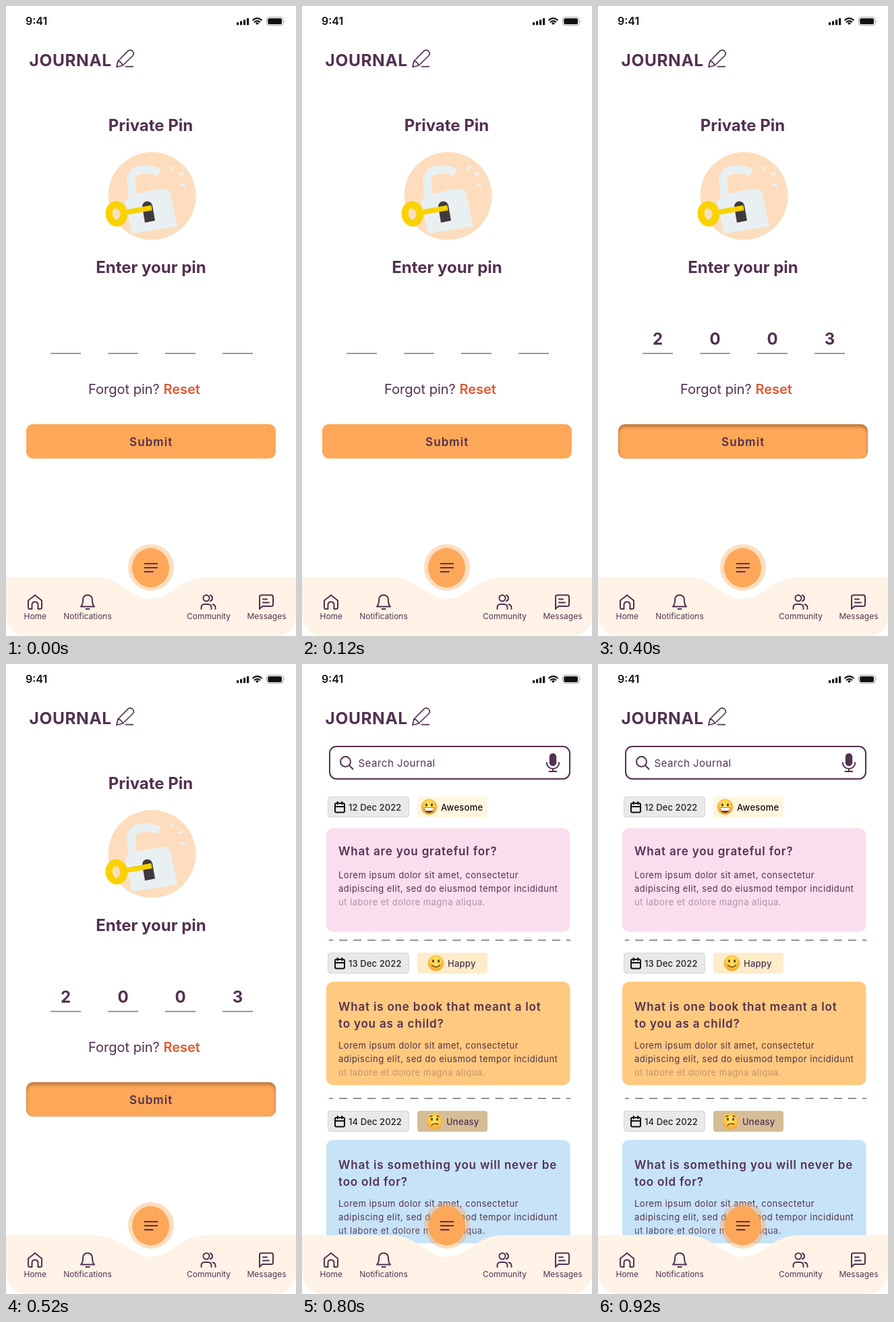
Animation, 430 px wide and 932 px high, one loop 1000 ms. Source, as an HTML page:

```html
<!DOCTYPE html>
<html lang="en">
<head>
<meta charset="utf-8">
<title>Journal pin</title>
<style>
  html, body { margin: 0; width: 100%; height: 100%; overflow: hidden; background: #fff; }
  svg { display: block; position: absolute; left: 0; top: 0; }
  text { font-family: Inter, sans-serif; fill: #533050; white-space: pre; }
  .mid { text-anchor: middle; }
  .head { font-weight: 700; font-size: 24px; }
  .nav { font-size: 12px; text-anchor: middle; }
  .line { fill: none; stroke: #533050; stroke-width: 2; stroke-linecap: round; stroke-linejoin: round; }
  .ask { font-weight: 600; font-size: 17px; letter-spacing: .82px; }
  .body { font-size: 13px; letter-spacing: .5px; }
  .chip { font-weight: 500; font-size: 13px; letter-spacing: .1px; }
  .cal { fill: none; stroke: #111; stroke-width: 2; stroke-linecap: round; }
  #press { position: absolute; left: 30px; top: 618.5px; width: 370px; height: 51px; border-radius: 10px;
    box-shadow: inset 0 4px 4px rgba(0, 0, 0, .25), inset 0 0 2px rgba(0, 0, 0, .25); }
</style>
</head>
<body>
<svg width="430" height="932" viewBox="0 0 430 932">
  <defs>
    <radialGradient id="skin" cx=".5" cy=".4" r=".6">
      <stop offset=".3" stop-color="#ffe05a"/><stop offset="1" stop-color="#f5a62a"/>
    </radialGradient>
  </defs>
  <rect id="paper" width="430" height="932" rx="30" fill="#fff"/>
  <g id="screen">
    <!-- status bar -->
    <text x="29" y="28" font-size="16" font-weight="600" style="fill:#111">9:41</text>
    <g fill="#111">
      <rect x="342" y="24" width="3.2" height="4.3" rx=".8"/>
      <rect x="347" y="22.3" width="3.2" height="6" rx=".8"/>
      <rect x="352" y="20.2" width="3.2" height="8.1" rx=".8"/>
      <rect x="357" y="18" width="3.2" height="10.3" rx=".8"/>
      <path d="M372.5 28l-2.6-2.7q2.6-2 5.2 0z"/>
      <rect x="388.3" y="18.3" width="20.7" height="8.6" rx="2"/>
      <path d="M412.2 20.6q1.8 1.9 0 4z" opacity=".45"/>
    </g>
    <g fill="none" stroke="#111">
      <path d="M365.5 21.2q7-6.2 14 0M368 24q4.500-3.800 9 0" stroke-width="2"/>
      <rect x="386.600" y="16.600" width="24.300" height="12" rx="3.500" opacity=".4"/>
    </g>

    <!-- title -->
    <text x="34.500" y="89" font-size="24.500" font-weight="700" letter-spacing=".6">JOURNAL</text>
    <path class="line" stroke-width="1.700" style="stroke-width:1.700" d="M164 90.300L166 81.500L180.800 66.700Q184 63.500 187.500 66.500Q191 70 188 73.500L173 88ZM166 81.500Q171.500 82.500 173 88M177.500 89.600H188.500"/>

    <g id="pin">
      <text class="head mid" x="214.500" y="185">Private Pin</text>
      <circle cx="216.500" cy="281" r="65" fill="#fdddbd"/>
      <path d="M188 282C186 262 181 248 196 243.500Q210 239 227 246" fill="none" stroke="#e9f0f1" stroke-width="12.500"/>
      <path d="M177 291Q178 282 189 279L229 270.500Q241 268 244 279L254 326L187 337Z" fill="#e9f0f1"/>
      <path d="M246 240.500l2.500-2.500M257.500 249.500l5-1.500M260 264.500l4.500 1.200" stroke="#e9f0f1" stroke-width="3.600" stroke-linecap="round"/>
      <path d="M206 320.500L202.300 298C201 287 215 286 217 295L221 317.500Z" fill="#403a3c"/>
      <path d="M177 305.500L216 298.500" stroke="#f9d200" stroke-width="7.500"/>
      <ellipse cx="163.800" cy="307.500" rx="11" ry="13.500" fill="none" stroke="#f9d200" stroke-width="10.500" transform="rotate(-6 163.800 307.500)"/>
      <path d="M160 300Q157 309 164 316" fill="none" stroke="#f2eedf" stroke-width="2"/>
      <text class="head mid" x="215" y="394.500">Enter your pin</text>
      <path d="M66 514h45m40 0h45m40 0h45m40 0h45" stroke="#533050" stroke-width="1.500" opacity=".7"/>
      <g id="digits"></g>
      <text x="122" y="573.500" font-size="20">Forgot pin? <tspan font-weight="600" style="fill:#e2592f">Reset</tspan></text>
      <rect x="30" y="618.500" width="370" height="51" rx="10" fill="#fda758"/>
      <text x="183" y="650.500" font-size="17" font-weight="600" letter-spacing="1.100">Submit</text>
    </g>

    <g id="journal">
      <rect class="line" x="41" y="122" width="356" height="48" rx="10"/>
      <circle class="line" cx="64.500" cy="144.500" r="7.500"/>
      <path class="line" d="M70 150l5.500 5.500"/>
      <text x="83.500" y="152" font-size="15" letter-spacing=".5">Search Journal</text>
      <rect x="366.800" y="132" width="10.400" height="19" rx="5.200" fill="#533050"/>
      <path class="line" d="M362.800 146a9.200 9 0 0 0 18.400 0M372 155.500V159M366.500 159h11"/>
      <path d="M40 408.500H398M40 642.500H398" stroke="#533050" stroke-width="1.200" stroke-dasharray="12 9.060" stroke-dashoffset="6"/>
      <g id="entries"></g>
    </g>

    <!-- navigation -->
    <path d="M0 845H132C172 845 185 877 215 877S258 845 298 845H430V902a30 30 0 0 1-30 30H30a30 30 0 0 1-30-30Z" fill="#fef3e6"/>
    <ellipse cx="215" cy="830.500" rx="34" ry="34.500" fill="#fda758" opacity=".38"/>
    <ellipse cx="214.500" cy="831" rx="27.500" ry="29" fill="#fda758"/>
    <path class="line" style="stroke-linecap:butt" d="M205 825h20M205 831h20M205 837h13.500"/>
    <path class="line" d="M33 879.500L43 871.500L53 879.500V889.500Q53 892 50.500 892H47.500V886Q47.500 881.500 43 881.500T38.500 886V892H35.500Q33 892 33 889.500Z"/>
    <path class="line" d="M111 888.500Q114 886 114 879Q114 871.500 121 871.500T128 879Q128 886 131 888.500ZM118.500 892h5"/>
    <g class="line">
      <circle cx="297" cy="876" r="4.500"/>
      <path d="M289.500 892v-2q0-5 5-5h5q5 0 5 5v2M303 871.800a4.500 4.500 0 0 1 0 8.500M306.500 885.300q4 1 4 5v1.700"/>
      <path d="M376 892V874Q376 871.500 378.500 871.500H393.500Q396 871.500 396 874V885.500Q396 888 393.500 888H380ZM381 877.500h6M381 882.500h9"/>
    </g>
    <text class="nav" x="43.300" y="907">Home</text>
    <text class="nav" x="121" y="907">Notifications</text>
    <text class="nav" x="300.500" y="907">Community</text>
    <text class="nav" x="386.500" y="907">Messages</text>
  </g>
</svg>
<div id="press"></div>

<script>
const $ = id => document.getElementById(id);
const text = (cls, x, y, str, extra = '') => `<text class="${cls}" x="${x}" y="${y}" ${extra}>${str}</text>`;
const lorem = ['Lorem ipsum dolor sit amet, consectetur',
  'adipiscing elit, sed do eiusmod tempor incididunt',
  'ut labore et dolore magna aliqua.'];

// Faces are drawn around 0,0 with radius 12
const eyes = '<g fill="#5b3a12"><ellipse cx="-4" cy="-3" rx="1.500" ry="2.200"/><ellipse cx="4" cy="-3" rx="1.500" ry="2.200"/></g>';
const stroke = d => `<path d="${d}" fill="none" stroke="#6b4216" stroke-width="1.500" stroke-linecap="round"/>`;
const mouths = {
  grin: '<path d="M-8 1H8Q7 9 0 9T-8 1Z" fill="#7a3b1c"/><path d="M-7.300 1.500H7.300L6 5.500H-6Z" fill="#fff"/>',
  smile: stroke('M-6 3Q0 9 6 3'),
  uneasy: stroke('M-4.500 6Q0 2 5 4.500M-6.500 -7l3-1M6.500 -7l-3-1')
};

const entries = [
  { top: 196, date: '12 Dec 2022', mood: 'Awesome', moodX: 206, ink: '#111', chip: '#fff6e0', faceX: 188.5, mouth: 'grin',
    card: 243, fill: '#fbdeee', ask: ['What are you grateful for?'], askY: 283, bodyY: 317, fade: .45 },
  { top: 427, date: '13 Dec 2022', mood: 'Happy', moodX: 216, ink: '#533050', chip: '#ffeccb', faceX: 198.5, mouth: 'smile',
    card: 470, fill: '#ffc97f', ask: ['What is one book that meant a lot', 'to you as a child?'], askY: 513, bodyY: 569, fade: .35 },
  { top: 661, date: '14 Dec 2022', mood: 'Uneasy', moodX: 214, ink: '#533050', chip: '#d4bd97', faceX: 196.5, mouth: 'uneasy',
    card: 704, fill: '#c7e3f8', ask: ['What is something you will never be', 'too old for?'], askY: 747, bodyY: 803, fade: .9 }
];

const drawEntry = e => `
  <rect x="38.500" y="${e.top + .5}" width="120" height="30" rx="3.500" fill="#e9e9ea" stroke="#d6d6d9"/>
  <g class="cal" transform="translate(49 ${e.top + 9})">
    <rect y="1" width="14" height="13.500" rx="2"/><path d="M0 6H14M3.700 -1V2.500M10.300 -1V2.500"/>
  </g>
  ${text('chip', 69, e.top + 21, e.date, 'style="fill:#222"')}
  <rect x="171" y="${e.top}" width="104" height="31" rx="4" fill="${e.chip}"/>
  <g transform="translate(${e.faceX} ${e.top + 15.5})"><circle r="11.800" fill="url(#skin)"/>${eyes}${mouths[e.mouth]}</g>
  ${text('chip', e.moodX, e.top + 21, e.mood, `style="fill:${e.ink};letter-spacing:.25px"`)}
  <rect x="36" y="${e.card}" width="361.500" height="153" rx="10" fill="${e.fill}"/>
  ${e.ask.map((s, i) => text('ask', 54, e.askY + 25 * i, s)).join('')}
  ${lorem.map((s, i) => text('body', 54, e.bodyY + 20 * i, s, i == 2 ? `opacity="${e.fade}"` : '')).join('')}`;

$('entries').innerHTML = entries.map(drawEntry).join('');
$('digits').innerHTML = [...'2003'].map((d, i) => text('head mid', 88.5 + 85 * i, 501, d)).join('');

const show = (id, on) => $(id).style.display = on ? '' : 'none';

// Steps: empty pin, filled pin, pressed button, fading out, journal
function draw() {
  const step = Math.floor(performance.now() % 1000 / 200);
  show('pin', step < 4);
  show('digits', step > 0);
  show('press', step == 2);
  show('journal', step == 4);
  $('screen').style.opacity = step == 3 ? .6 : 1;
  $('paper').style.fill = step == 3 ? '#fdfdfd' : '#fff';
  requestAnimationFrame(draw);
}
draw();
</script>
</body>
</html>
```
